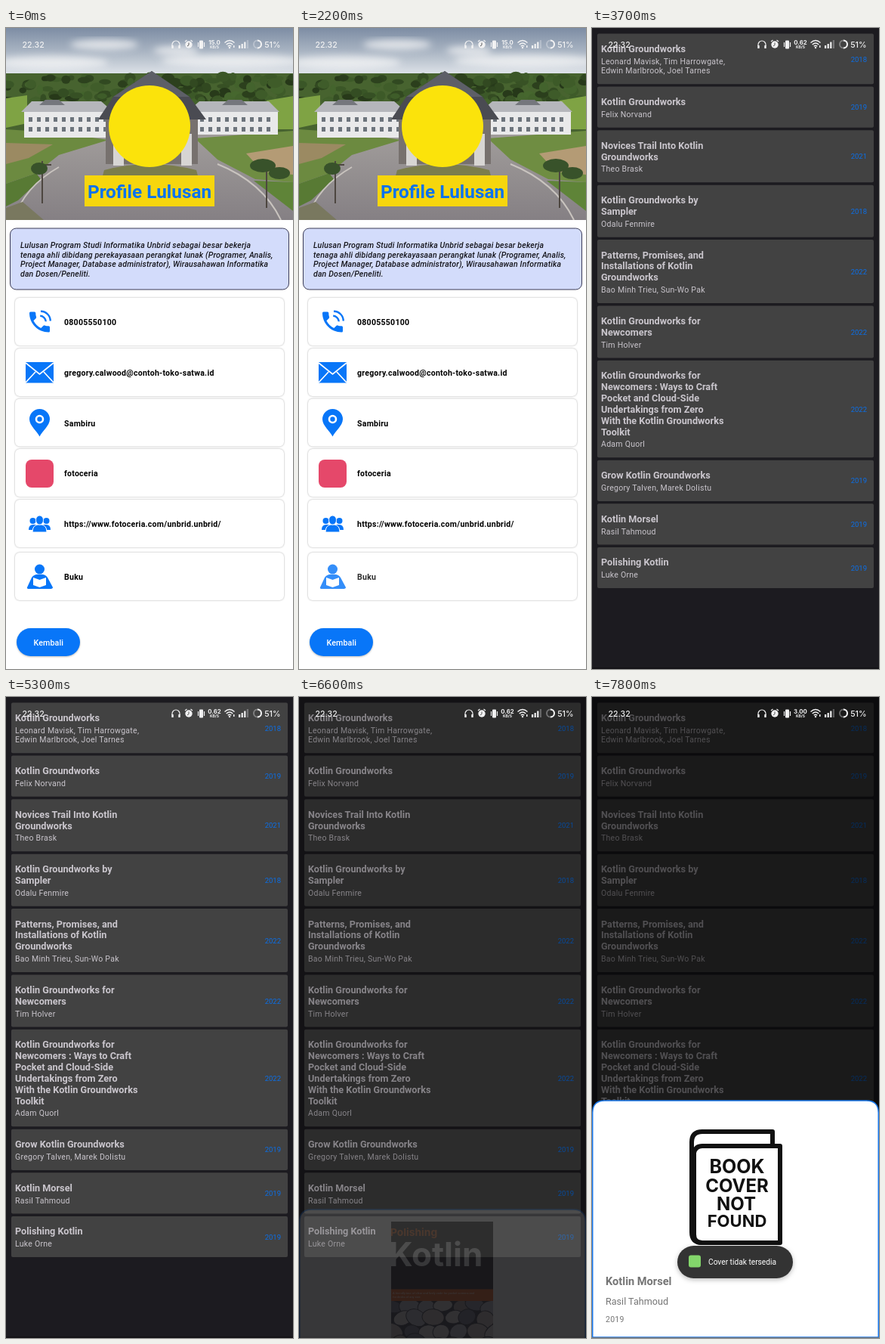
Animation of 380x848 px, one loop 8 s. Source, as an HTML page:

```html
<!DOCTYPE html>
<html lang="id">
<head>
<meta charset="utf-8">
<style>
html, body { margin: 0; height: 100%; overflow: hidden; background: #fff; }
svg { display: block; width: 100vw; height: 100vh; }
text { font-family: Roboto, sans-serif; white-space: pre; }
.b { font-weight: 700; }
.ui, .ui text { font-family: Inter, sans-serif; }
.spaced { letter-spacing: .25px; }
.card { fill: #fff; filter: drop-shadow(0 .6px 1px #0005); }
.blue { fill: #0876f8; }
.mid { text-anchor: middle; }
.end { text-anchor: end; }
</style>
</head>
<body>
<svg viewBox="0 0 380 848" preserveAspectRatio="none">
  <defs>
    <linearGradient id="sky" x2="0" y2="1">
      <stop offset="0" stop-color="#7d8da4"/><stop offset=".45" stop-color="#aab5c3"/><stop offset="1" stop-color="#eef1f4"/>
    </linearGradient>
    <linearGradient id="road" x2="0" y2="1">
      <stop offset="0" stop-color="#a19d9b"/><stop offset="1" stop-color="#858084"/>
    </linearGradient>
    <clipPath id="photoClip"><path d="M0 0h380v254H0z"/></clipPath>
    <clipPath id="stoneClip"><path d="M122 655h135v93H122z"/></clipPath>
    <filter id="soft"><feGaussianBlur stdDeviation="5"/></filter>
  </defs>

  <g id="profile">
    <path d="M0 0h380v848H0z" fill="#fff"/>
    <g clip-path="url(#photoClip)">
      <path d="M0 0h380v70H0z" fill="url(#sky)"/>
      <g fill="#f4f5f6" opacity=".75" filter="url(#soft)">
        <ellipse cx="60" cy="46" rx="75" ry="9"/><ellipse cx="130" cy="22" rx="45" ry="7"/>
        <ellipse cx="300" cy="44" rx="95" ry="9"/><ellipse cx="225" cy="30" rx="30" ry="6"/>
      </g>
      <path d="M0 60h380v194H0z" fill="#47632f"/>
      <g id="trees"></g>
      <path d="M0 93l28-4v37L0 132zM345 96l35-6v44h-35z" fill="#7fa344"/>
      <path d="M0 138h380v116H0z" fill="url(#road)"/>
      <path d="M0 134l70 5 66 9-66 20-30 24L0 206z" fill="#6c8a40"/>
      <path d="M0 152l62 2-32 18-30 8z" fill="#9b8a62"/>
      <path d="M0 206l40-14 6 8-30 28-16 8z" fill="#587a34"/>
      <path d="M250 146l130-10v68l-50-4-50-26z" fill="#6f8d42"/>
      <path d="M318 166l62-10v38l-40-4z" fill="#b49b75"/>
      <path d="M328 202l52 2v38z" fill="#5f8438"/>
      <path d="M130 188q60-16 122 0l8 30H122z" fill="#7b7d4c"/>
      <path d="M70 184q-46 26-60 70M280 180q60 24 84 74" fill="none" stroke="#c9c4bf" stroke-width="2"/>
      <path d="M24 111h118v34H24zM240 111h120v30H240z" fill="#e9e9ea"/>
      <path d="M20 111l14-14h92l16 14zM240 111l16-14h92l14 14z" fill="#b5b6bb"/>
      <path d="M44 102l8-7h18l8 7zM286 102l8-7h18l8 7z" fill="#75777d"/>
      <path d="M30 121h108M30 134h108M246 121h110M246 134h110" stroke="#6d747c" stroke-width="6" stroke-dasharray="5 6"/>
      <path d="M132 118h122v62H132z" fill="#77716e"/>
      <path d="M142 140h14v42h-14zM232 140h14v42h-14z" fill="#d7d5d3"/>
      <path d="M193 57l50 34 22 30H122l20-30z" fill="#4a4b52"/>
      <path d="M193 57l50 34H142z" fill="#5d5f67"/>
      <path d="M48 176v56M36 181h24M345 186v52" stroke="#4d4640" stroke-width="2"/>
      <g fill="#38522a"><ellipse cx="44" cy="186" rx="11" ry="8"/><ellipse cx="340" cy="182" rx="17" ry="9"/><ellipse cx="362" cy="192" rx="14" ry="8"/></g>
      <path d="M0 238l22-8 28 24H0z" fill="#79785f"/>
    </g>
    <circle cx="190" cy="130" r="54" fill="#fbe30b"/>
    <path d="M104 195h172v41H104z" fill="#f6d60d"/>
    <text class="b mid" x="190" y="224.5" font-size="24.3" fill="#0b72ee">Profile Lulusan</text>
    <rect x="5.5" y="265" width="369" height="81" rx="8" fill="#d3dcfb" stroke="#3b3b55"/>
    <g id="about" font-size="10.56" font-weight="500" font-style="italic" letter-spacing=".15" fill="#16161c"></g>
    <g id="rows" class="b spaced" font-size="10.56"></g>
    <g class="blue">
      <g transform="translate(26.5 371) scale(1.5)">
        <path d="M6.62 10.79c1.44 2.83 3.76 5.14 6.59 6.59l2.2-2.2q.5-.4 1.02-.24 1.7.57 3.57.57 1 0 1 1V20q0 1-1 1C10.6 21 3 13.4 3 4q0-1 1-1h3.5q1 0 1 1 0 1.9.57 3.57.1.6-.25 1.02z"/>
        <path d="M12.5 6.5a5.5 5.5 0 0 1 5 5M13 2.5a8.5 8.5 0 0 1 8.5 8.5" fill="none" stroke="#0876f8" stroke-width="1.6"/>
      </g>
      <path d="M26 442h37v27.5H26z"/>
      <path d="M26 443l18.5 15L63 443M26 469l13-14M63 469l-13-14" fill="none" stroke="#fff" stroke-width="1.7"/>
      <path d="M44.5 540.5C41 533 31 526 31 517.5a13.5 13.5 0 0 1 27 0C58 526 48 533 44.5 540.5z"/>
      <circle cx="44.5" cy="517.5" r="4.5" fill="none" stroke="#fff" stroke-width="2.6"/>
      <rect x="26" y="571" width="37" height="37" rx="8" fill="#e5486a"/>
      <circle cx="35.5" cy="652" r="4"/><circle cx="53.5" cy="652" r="4"/>
      <path d="M30 664q0-7 6-7h17q6 0 6 7z"/>
      <path d="M35 667q0-9 7-10h5q7 1 7 10z" stroke="#fff"/>
      <ellipse cx="44.5" cy="651" rx="5" ry="6" stroke="#fff" stroke-width=".8"/>
      <g id="reader">
        <circle cx="44.5" cy="716" r="6.5"/>
        <path d="M34 727q4-5 10.5-4 7-1 10.5 4l7 13q0 2-4 2H31q-4 0-3-2z"/>
        <path d="M36 727l8.5 3 8.5-3v10l-8.5 3-8.5-3z" fill="#fff"/>
      </g>
      <rect x="14" y="794" width="84" height="37" rx="18.5" style="filter:drop-shadow(0 1px 1px #0004)"/>
    </g>
    <text class="mid" x="56.3" y="816.5" font-size="10.7" font-weight="500" letter-spacing=".1" fill="#fff">Kembali</text>
  </g>

  <g id="dark">
    <path d="M0 0h380v848H0z" fill="#1c1b20"/>
    <path d="M0 846h380v2H0z" fill="#141317"/>
    <g id="books"></g>
  </g>
  <path id="dim" d="M0 0h380v848H0z"/>

  <g id="sheet">
    <path d="M.75 847V550q0-16 16-16h346.500q16 0 16 16v297z" fill="#fff" stroke="#1a78ea" stroke-width="1.5"/>
    <path d="M0 847.5h380" stroke="#70757d"/>
    <g id="cover">
      <path d="M122 550h135v198H122z" fill="#333438"/>
      <path d="M122 639.5h135v15.5H122z" fill="#ec6a25"/>
      <g class="ui b">
        <text x="121" y="569" font-size="13.8" fill="#ee7332">Polishing</text>
        <text x="119" y="609.5" font-size="44" fill="#fff">Kotlin</text>
      </g>
      <g font-size="4" fill="#fff">
        <text x="124" y="646">A friendly tour of clear and lively code for pocket screens and</text>
        <text x="124" y="651">for desks of any size</text>
      </g>
      <g id="stones" clip-path="url(#stoneClip)"></g>
      <path d="M122 735h97v13h-97z" fill="#333438" opacity=".8"/>
      <text x="123" y="742" font-size="4.5" fill="#fff">Luke Orne</text>
      <path d="M219 713h38v35h-38z" fill="#ec6a25"/>
    </g>
    <g id="missing" class="ui b mid" fill="#111">
      <g fill="none" stroke="#111" stroke-width="6" stroke-linejoin="round">
        <path d="M239 592v-17h-93q-14 0-14 14v119q0 14 14 14"/>
        <path d="M135 603q2-9 11-9h103v128H146q-11 0-11-11z"/>
      </g>
      <text x="192" y="630" font-size="25">BOOK</text><text x="192" y="655" font-size="24">COVER</text>
      <text x="191" y="679" font-size="24">NOT</text><text x="192" y="701" font-size="22">FOUND</text>
    </g>
    <g fill="#757575">
      <text id="bookTitle" class="b" x="18" y="778" font-size="14.6"></text>
      <text id="bookAuthor" x="18" y="803.5" font-size="12.6"></text>
      <text class="spaced" x="18" y="827" font-size="10.56">2019</text>
    </g>
  </g>

  <g id="toast">
    <rect x="113" y="726" width="153" height="43" rx="21.5" fill="#333" style="filter:drop-shadow(0 2px 3px #0004)"/>
    <rect x="128" y="738.5" width="16" height="16" rx="3" fill="#83d66b"/>
    <text x="154" y="751" font-size="10.2" fill="#fff">Cover tidak tersedia</text>
  </g>

  <g class="ui" fill="#f2f2f3" font-size="10.6" font-weight="500">
    <text x="21.5" y="25.5">22.32</text>
    <text class="end" x="363.5" y="25.5">51%</text>
    <g class="mid b"><text id="speed" x="276" y="21.5" font-size="7.8"></text><text x="276" y="26.5" font-size="5">KB/S</text></g>
    <g fill="none" stroke="#f2f2f3" stroke-width="1.2">
      <path d="M220 24v-2a5 5 0 0 1 10 0v2"/>
      <path d="M220.5 23v4M229.5 23v4" stroke-width="2.4"/>
      <path d="M237 18l2.5-2M247 18l-2.5-2M254.5 19v6M262.5 19v6"/>
      <path d="M289.5 19.5q6.5-6 13 0M291.7 22q4.3-4 8.6 0M293.8 24.2q2.2-2 4.4 0" stroke-width="1.4"/>
      <circle cx="333" cy="21.5" r="5" stroke-width="2" opacity=".35"/>
      <path d="M333 16.5a5 5 0 0 1 0 10" stroke-width="2"/>
    </g>
    <circle cx="242" cy="22" r="4.7"/><path d="M242 19.5v3l-2 1.5" stroke="#555" fill="none"/>
    <rect x="256" y="16.5" width="5" height="11" rx="1"/>
    <circle cx="296" cy="26" r="1.2"/><path d="M301 23h1.5v3H301z"/>
    <path d="M308 23h2.2v4H308zM311.6 21h2.2v6h-2.2zM315.2 18.5h2.2V27h-2.2z"/>
    <path d="M318.8 16h2.2v11h-2.2z" opacity=".3"/>
  </g>
</svg>

<script>
const $ = id => document.getElementById(id);
const clamp = x => Math.min(1, Math.max(0, x));
const span = (t, a, b) => clamp((t - a) / (b - a));
const smooth = x => (1 - Math.cos(Math.PI * x)) / 2;
const label = (x, y, s, attrs = '') => `<text x="${x}" y="${y}" ${attrs}>${s}</text>`;

let seed = 7;
const rand = () => (seed = seed * 16807 % 2147483647) / 2147483647;
const blob = (x, y, rx, ry, fill, extra = '') =>
  `<ellipse cx="${x}" cy="${y}" rx="${rx}" ry="${ry}" fill="${fill}" ${extra}/>`;

let trees = '';
for (let i = 0; i < 150; i++) {
  const green = 55 + rand() * 50;
  trees += blob(rand() * 380, 64 + rand() * 36, 4 + rand() * 6, 3 + rand() * 4,
    `rgb(${green * .68},${green},${green * .45})`);
}
$('trees').innerHTML = trees;

const tints = ['#b9bcc4', '#8f97a6', '#d3d2d2', '#a39c98', '#c6beb5', '#747c8b'];
let stones = '<path d="M122 655h135v93H122z" fill="#3d4149"/>';
for (let row = 0; row < 6; row++) for (let col = 0; col < 7; col++) {
  const x = 122 + col * 22 + row % 2 * 11 + rand() * 7, y = 659 + row * 17 + rand() * 6;
  stones += blob(x, y, 11 + rand() * 5, 8 + rand() * 4, tints[Math.floor(rand() * 6)],
    `stroke="#3f444e" transform="rotate(${rand() * 70 - 35} ${x} ${y})"`);
}
$('stones').innerHTML = stones;

$('about').innerHTML = [
  'Lulusan Program Studi Informatika Unbrid sebagai besar bekerja',
  'tenaga ahli dibidang perekayasaan perangkat lunak (Programer, Analis,',
  'Project Manager, Database administrator), Wirausahawan Informatika',
  'dan Dosen/Peneliti.'
].map((s, i) => label(19, 291 + i * 12.6, s)).join('');

$('rows').innerHTML = [
  [357, '08005550100'],
  [424, 'gregory.calwood@contoh-toko-satwa.id'],
  [490.5, 'Sambiru'],
  [557, 'fotoceria'],
  [624, 'https://www.fotoceria.com/unbrid.unbrid/'],
  [694, 'Buku', 'id="bookRow"']
].map(([y, s, attrs]) =>
  `<rect class="card" x="12" y="${y}" width="356" height="63" rx="6"/>` + label(77, y + 36.2, s, attrs)).join('');

// title lines | author lines | year
const books = `Kotlin Groundworks|Leonard Mavisk, Tim Harrowgate,/Edwin Marlbrook, Joel Tarnes|2018
Kotlin Groundworks|Felix Norvand|2019
Novices Trail Into Kotlin/Groundworks|Theo Brask|2021
Kotlin Groundworks by/Sampler|Odalu Fenmire|2018
Patterns, Promises, and/Installations of Kotlin/Groundworks|Bao Minh Trieu, Sun-Wo Pak|2022
Kotlin Groundworks for/Newcomers|Tim Holver|2022
Kotlin Groundworks for/Newcomers : Ways to Craft/Pocket and Cloud-Side/Undertakings from Zero/With the Kotlin Groundworks/Toolkit|Adam Quorl|2022
Grow Kotlin Groundworks|Gregory Talven, Marek Dolistu|2019
Kotlin Morsel|Rasil Tahmoud|2019
Polishing Kotlin|Luke Orne|2019`.split('\n').map(line => line.split('|'));

let cardY = 7.6, cards = '';
for (const [title, author, year] of books) {
  const titles = title.split('/'), authors = author.split('/');
  const lead = 14.85 * (titles.length - 1);
  const height = 54.2 + lead + 12.4 * (authors.length - 1);
  cards += `<rect x="7" y="${cardY}" width="366" height="${height}" rx="2" fill="#424242"/>`
    + titles.map((s, i) => label(12, cardY + 24.5 + i * 14.85, s, 'class="b" font-size="12.67" fill="#cac6cd"')).join('')
    + authors.map((s, i) => label(12, cardY + 40.3 + lead + i * 12.4, s, 'class="spaced" font-size="10.56" fill="#cac6cd"')).join('')
    + label(364, cardY + height / 2 + 3.6, year, 'class="end" font-size="9.5" fill="#0b6fe8"');
  cardY += height + 3.4;
}
$('books').innerHTML = cards;

const show = (id, opacity) => {
  $(id).style.opacity = opacity;
  $(id).style.display = opacity > 0 ? '' : 'none';
};

function draw(t) {
  const pressed = t >= 2000 && t < 2600;
  $('reader').style.opacity = $('bookRow').style.opacity = pressed ? .82 : 1;
  show('dark', smooth(span(t, 2250, 2580)));
  show('books', t >= 3700 ? 1 : 0);

  const second = t >= 7000;
  const enter = smooth(second ? span(t, 7300, 7500) : span(t, 5300, 5500));
  const leave = second ? 0 : span(t, 6463, 6613) ** 2;
  const dimLeft = second ? 1 : 1 - span(t, 6463, 6780);
  show('dim', .6 * enter * dimLeft);
  show('sheet', enter * (1 - leave));
  $('sheet').setAttribute('transform', `translate(0 ${170 * (1 - enter + leave)})`);
  show('cover', second ? 0 : 1);
  show('missing', second ? 1 : 0);
  const [title, author] = books[second ? 8 : 9];
  $('bookTitle').textContent = title;
  $('bookAuthor').textContent = author;
  show('toast', smooth(span(t, 7550, 7800)));
  $('speed').textContent = t < 2800 ? '15.0' : t < 7300 ? '0.62' : '3.00';
}

const began = performance.now();
function tick() {
  draw((performance.now() - began) % 8000);
  requestAnimationFrame(tick);
}
tick();
</script>
</body>
</html>
```
